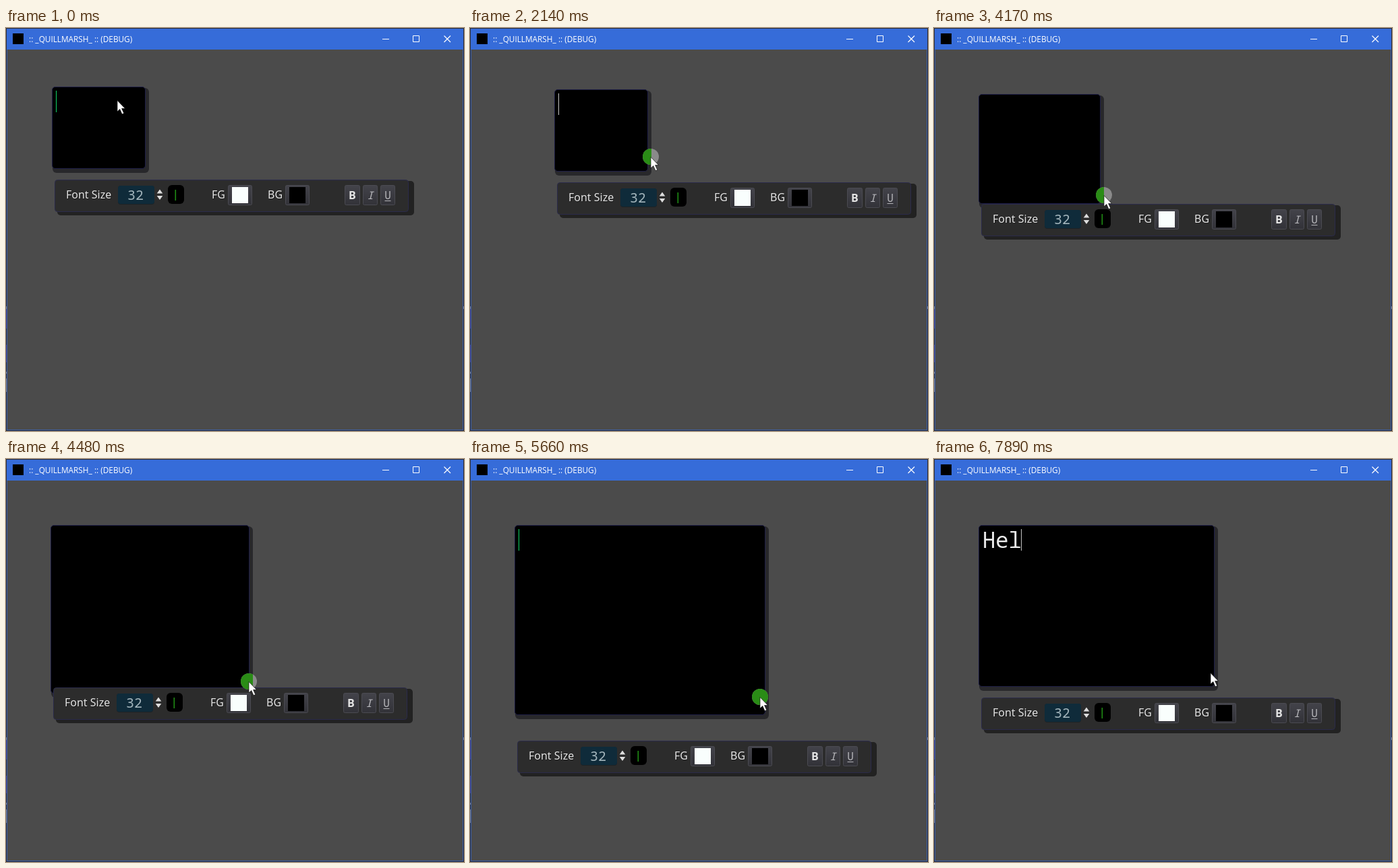
Animation of 679 by 598 pixels, one loop 8000 ms. Source, as an HTML page:

```html
<!DOCTYPE html>
<html lang="en">
<head>
<meta charset="utf-8">
<title>Note panel</title>
<style>
  html, body { margin: 0; width: 100%; height: 100%; overflow: hidden; background: #4b4b4b; }
  svg { display: block; }
  text { white-space: pre; }
  .ui { font: 16px "Noto Sans", sans-serif; fill: #e4e4e4; }
  .mono { font-family: "Noto Sans Mono", monospace; font-weight: 300; }
</style>
</head>
<body>
<svg width="679" height="598" viewBox="0 0 679 598">
  <defs>
    <linearGradient id="key" x2="0" y2="1">
      <stop stop-color="#43434a"/><stop offset="1" stop-color="#323238"/>
    </linearGradient>
    <clipPath id="clip"><rect id="clipRect"/></clipPath>
  </defs>

  <!-- window -->
  <rect width="679" height="598" fill="#2b2b31"/>
  <rect x="1" y="1" width="677" height="596" fill="#3a5fae"/>
  <rect x="2" y="31" width="675" height="565" fill="#4b4b4b"/>
  <rect x="1" y="1" width="677" height="31" fill="#366cd9"/>
  <path d="M.5 416v30M.5 470v26" stroke="#3f3880"/>
  <path d="M.5 413v4M.5 510v3M.5 520v20M678.5 413v4" stroke="#77777c"/>
  <rect x="10" y="8" width="16" height="16" fill="#000"/>
  <text x="34" y="21" font-family="Open Sans, sans-serif" font-size="11.8" fill="#fff">:: _QUILLMARSH_ :: (DEBUG)</text>
  <g fill="none" stroke="#fff">
    <path d="M558 16.5h10M603.5 11.5h9v9h-9z"/>
    <path d="M649.5 11.5l9.5 9.5M659 11.5l-9.5 9.5" stroke-width="1.2"/>
  </g>

  <!-- text panel -->
  <g id="panel">
    <rect id="shade" x="1" y="2" rx="6" fill="#28282b"/>
    <rect id="board" x=".5" y=".5" rx="4.5" fill="#000" stroke="#1e1e46"/>
    <text id="typed" class="mono" x="6" y="34" font-size="32" fill="#ececec"></text>
    <rect id="caret" y="6" width="1" height="32"/>
  </g>

  <!-- toolbar -->
  <g id="bar">
    <rect x="4" y="2" width="529" height="51" rx="5" fill="#222"/>
    <rect x=".5" y=".5" width="524" height="47" rx="4" fill="#2c2c2c" stroke="#2b2b4b"/>
    <g class="ui" fill="#111" opacity=".6" transform="translate(1 1)" style="fill:#111">
      <text x="17" y="28" style="fill:#111">Font Size</text>
      <text x="233" y="28" style="fill:#111">FG</text>
      <text x="316" y="28" style="fill:#111">BG</text>
    </g>
    <text class="ui" x="17" y="28">Font Size</text>
    <rect x="94" y="9" width="54" height="28" rx="4" fill="#1c2226"/>
    <rect x="94" y="9" width="54" height="27" rx="4" fill="#0f2b3a"/>
    <text class="mono" x="108" y="29.5" font-size="20" fill="#a3b5bc">32</text>
    <path d="M156 14.5l4.3 6h-8.6zM156 30l4.3-6h-8.6z" fill="#dedede"/>
    <rect x="168" y="8" width="24" height="28" rx="6" fill="#000"/>
    <rect x="178.5" y="15" width="1.6" height="16" fill="#1f8c14"/>
    <text class="ui" x="233" y="28">FG</text>
    <text class="ui" x="316" y="28">BG</text>
    <g fill="url(#key)" stroke="#4b4b52">
      <rect x="257.5" y="8.5" width="35" height="29" rx="2"/>
      <rect x="342.5" y="8.5" width="35" height="29" rx="2"/>
      <rect x="430.5" y="8.5" width="22" height="29" rx="2"/>
      <rect x="457.5" y="8.5" width="21" height="29" rx="2"/>
      <rect x="483.5" y="8.5" width="21" height="29" rx="2"/>
    </g>
    <rect x="263" y="11" width="24" height="24" fill="#f9fefd"/>
    <rect x="348" y="11" width="24" height="24" fill="#000"/>
    <g text-anchor="middle">
      <text class="ui" x="441.5" y="29" font-weight="700" style="font-weight:700">B</text>
      <text class="mono" x="468" y="28.5" font-size="16" font-style="italic" fill="#b4b4b8">I</text>
      <text class="mono" x="494" y="28.5" font-size="16" fill="#b4b4b8">U</text>
    </g>
    <path d="M489.5 31.5h9" stroke="#b4b4b8"/>
  </g>

  <!-- pointer -->
  <g id="press">
    <circle class="dot" r="12" fill="#8a8a8a"/>
    <g clip-path="url(#clip)"><circle class="dot" r="12" fill="#278c13" opacity=".97"/></g>
  </g>
  <path id="arrow" d="M0 0v16.5l3.8-3.5 3.2 7.3 2.8-1.2-3.2-7.1h5z" fill="#fff" stroke="#111" stroke-width=".7"/>
</svg>

<script>
const LOOP = 8000;
const $ = id => document.getElementById(id);
const set = (el, attrs) => { for (const k in attrs) el.setAttribute(k, attrs[k]); };
const move = (el, x, y) => set(el, { transform: `translate(${x} ${y})` });

// Stretches of movement: first step, last step, number of steps
const BURSTS = [
  [550, 940, 6], [1820, 2380, 8], [2550, 3140, 9], [3940, 4710, 11],
  [4790, 5170, 6], [5420, 6190, 11], [6270, 6800, 8], [6950, 7030, 2]
];
// Keys: time, then values
const MOUSE = [
  [472, 165, 107], [940, 201, 187], [1740, 201, 187], [2140, 268, 191], [2380, 273, 195],
  [2476, 273, 195], [3140, 199, 198], [3863, 199, 198], [4171, 252, 248], [4710, 441, 392],
  [5343, 441, 392], [5651, 430, 353], [6190, 410, 316], [6800, 410, 316], [6950, 410, 317]
];
const PLACE = [
  [1740, 68, 87], [2140, 125, 91], [2380, 140, 95], [2476, 140, 95], [3140, 66, 98]
];
const SIZE = [
  [3863, 139, 122], [4171, 181, 163], [4710, 380, 315],
  [5343, 380, 315], [5651, 372, 282], [6190, 350, 240]
];
const BAR_Y = [
  [3863, 236], [4171, 261], [4710, 397], [4866, 420], [4942, 426], [5170, 430],
  [5343, 430], [5651, 418], [6190, 369], [6345, 363], [6573, 357], [6800, 355], [7030, 354]
];
const BLINKS = [150, 670, 1190, 1650, 2170, 2630, 3140, 3700, 4130, 4650, 5120, 5630, 6150, 6660, 7180, 7660];
const KEYS = [7660, 7810, 7890];

const within = (t, a, b) => t >= a && t < b;
const passed = (list, t) => list.filter(v => t >= v).length;

// Time of the latest visible step
function snap(t) {
  let s = 0;
  for (const [a, b, n] of BURSTS) {
    const step = (b - a) / (n - 1);
    const k = Math.floor((t - a) / step + 0.15);
    if (k >= 0) s = a + Math.min(k, n - 1) * step;
  }
  return s;
}

function sample(keys, t) {
  const i = keys.findIndex(k => k[0] > t);
  if (i === 0) return keys[0].slice(1);
  if (i < 0) return keys[keys.length - 1].slice(1);
  const a = keys[i - 1], b = keys[i], p = (t - a[0]) / (b[0] - a[0]);
  return a.slice(1).map((v, j) => Math.round(v + (b[j + 1] - v) * p));
}

function draw(t) {
  const s = snap(t);
  const [x, y] = sample(PLACE, s), [w, h] = sample(SIZE, s), [mx, my] = sample(MOUSE, s);
  const barY = s < 3863 ? y + 138 : sample(BAR_Y, s)[0];

  move($("panel"), x, y);
  set($("board"), { width: w - 1, height: h - 1 });
  set($("shade"), { width: w + 4, height: h + 4 });
  move($("bar"), x + 4, barY);

  const n = passed(KEYS, t);
  $("typed").textContent = "Hel".slice(0, n);
  const pale = n > 0 || within(t, 1820, 3140);
  set($("caret"), {
    x: 6 + Math.round(19.2 * n - 0.4 * (n > 0)),
    fill: pale ? "#c4c4c4" : "#0fd668",
    visibility: passed(BLINKS, t) % 2 ? "hidden" : "visible"
  });

  const down = within(t, 1420, 3300) || within(t, 3770, 6730);
  set($("press"), { visibility: down ? "visible" : "hidden" });
  document.querySelectorAll(".dot").forEach(d => set(d, { cx: mx, cy: my }));
  set($("clipRect"), { width: x + w + 5, height: y + h + 6 });
  move($("arrow"), mx, my + 0.5);
}

const start = performance.now();
function tick() {
  draw((performance.now() - start) % LOOP);
  requestAnimationFrame(tick);
}
tick();
</script>
</body>
</html>
```
